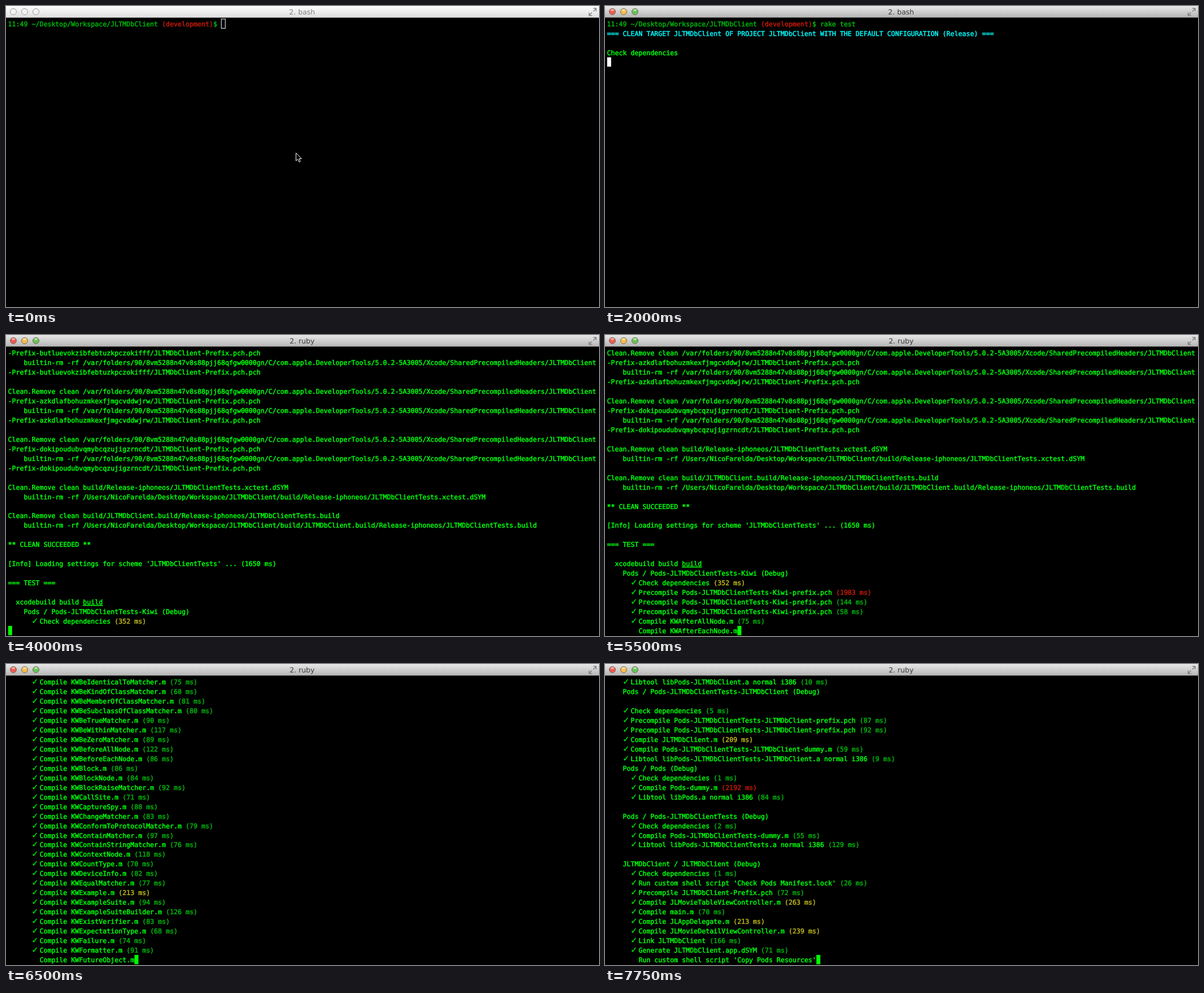
Write an HTML page that moves like this. It is 1050 px wide and 533 px high and loops after 8 s.

```html
<!DOCTYPE html>
<html lang="en">
<head>
<meta charset="utf-8">
<title>Terminal</title>
<style>
  html, body { margin: 0; width: 100%; height: 100%; overflow: hidden; background: #000; }
  svg { display: block; width: 100vw; height: 100vh; }
  text { text-rendering: geometricPrecision; }
  #rows text { font: 11.61px "DejaVu Sans Mono", monospace; }
  #rows tspan { fill: var(--ink); stroke: var(--ink); stroke-width: .5; }
  #name { font: 12.5px "DejaVu Sans", sans-serif; text-anchor: middle; }
  .b, .u { --ink: #00ff0c; }
  .u { text-decoration: underline; }
  .c { --ink: #00f8f8; }
  #rows .t { --ink: #00d40c; font: 14px "DejaVu Sans", sans-serif; }
  .g { --ink: #00b40c; }
  .y { --ink: #bcb41c; }
  .r { --ink: #c01a0a; }
</style>
</head>
<body>
<svg viewBox="0 0 1050 533" preserveAspectRatio="none">
  <defs>
    <linearGradient id="idle" x2="0" y2="1"><stop stop-color="#fdfdfd"/><stop offset="1" stop-color="#dedede"/></linearGradient>
    <linearGradient id="live" x2="0" y2="1"><stop stop-color="#e8e8e8"/><stop offset="1" stop-color="#b4b4b4"/></linearGradient>
  </defs>
  <rect width="1050" height="533"/>
  <rect id="bar" width="1050" height="20.5"/>
  <rect id="edge" y="20" width="1050" height="1"/>
  <g id="lights"></g>
  <text id="name" x="524.3" y="15"></text>
  <g fill="none" stroke="#777" stroke-width="1.2">
    <path d="M1040 9.5l4.5-4.5M1039.8 4.2h5.2v5.2M1037.5 11.5l-4.5 4.5M1037.7 16.8h-5.2v-5.2"/>
  </g>
  <g id="rows"></g>
  <rect id="cursor" width="7" height="16.5"/>
  <path id="pointer" d="M513.5 260.2v14l3.2-3 2.3 5.2 2.2-1-2.2-5h4.3z" fill="#000" stroke="#fff"/>
</svg>
<script>
const LOOP = 8000, ROWS = 30, LEFT = 3.5, TOP = 23, CW = 6.99, RH = 16.97;
const $ = id => document.getElementById(id);
const app = 'JLTMDbClient', tests = app + 'Tests', kiwi = `Pods-${tests}-Kiwi`;

// Build the log once; at() records what the screen holds from time t on.
const log = [], states = [];
const row = (...parts) => log.push(parts);
const say = text => row(['b', text]);
const gap = () => row();
const at = (t, ...tail) => states.push({ t, count: log.length, tail });
const busy = title => ['b', ' '.repeat(8) + title];
const tone = ms => ms >= 1000 ? 'r' : ms >= 200 ? 'y' : 'g';

function task(title, ms, pad = 6) {
  row(['b', ' '.repeat(pad)], ['t', '✓'], ['b', ` ${title} `], [tone(ms), `(${ms} ms)`]);
}
function compile(list, prefix = 'KW') {
  for (const item of list.split(' ')) {
    const [file, ms] = item.split(':');
    task(`Compile ${prefix}${file}.m`, +ms);
  }
}
const section = name => say(`    ${name} (Debug)`);

const banner = name => row(['c', `=== CLEAN TARGET ${name} OF PROJECT ${app} WITH THE DEFAULT CONFIGURATION (Release) ===`]);
const remove = path => say('Clean.Remove clean ' + path);
const rm = path => say('    builtin-rm -rf ' + path);

function clean(path) {
  gap();
  remove('build/' + path);
  rm(`/Users/NicoFarelda/Desktop/Workspace/${app}/build/${path}`);
}
function cleanHeader(hash) {
  const dir = `/var/folders/90/8vm5288n47v8s88pjj68qfgw0000gn/C/com.apple.DeveloperTools/5.0.2-5A3005/Xcode/SharedPrecompiledHeaders/${app}`;
  const rest = `-Prefix-${hash}/${app}-Prefix.pch.pch`;
  gap();
  remove(dir);
  say(rest);
  rm(dir);
  say(rest);
}

const prompt = typed => [['g', `11:49 ~/Desktop/Workspace/${app} `], ['r', '(development)'], ['g', '$ ' + typed]];
[[0, ''], [750, 'r'], [1000, 'rake'], [1250, 'rake te'], [1500, 'rake test']]
  .forEach(([t, typed]) => at(t, ...prompt(typed)));
row(...prompt('rake test'));
at(1750);

banner(app);
gap();
say('Check dependencies');
at(2000);
clean(`Release-iphoneos/${app}.app.dSYM`);
clean(`Release-iphoneos/${app}.app`);
cleanHeader('avzqkrhcmwtoyebnulgdfxpisjka');
at(2250);
cleanHeader('cgxnytoqwvlhebuzrkmadpifsjwe');
clean(`${app}.build/Release-iphoneos/${app}.build`);
at(2500);
gap();
banner(tests);
gap();
say('Check dependencies');
cleanHeader('fhkqdyvmxobzwnrjcetlgaspiuqo');
at(2750);
cleanHeader('butluevokzibfebtuzkpczokifff');
cleanHeader('azkdlafbohuzmkexfjmgcvddwjrw');
at(3000);
cleanHeader('dokipoudubvqmybcqzujigzrncdt');
clean(`Release-iphoneos/${tests}.xctest.dSYM`);
clean(`${app}.build/Release-iphoneos/${tests}.build`);
gap();
say('** CLEAN SUCCEEDED **');
at(3250);
gap();
const loading = `[Info] Loading settings for scheme '${tests}' ...`;
at(3500, ['b', loading]);
say(loading + ' (1650 ms)');
gap();
say('=== TEST ===');
gap();
row(['b', '  xcodebuild build '], ['u', 'build']);
section('Pods / ' + kiwi);
task('Check dependencies', 352);
at(4000);

const header = `Precompile ${kiwi}-prefix.pch`;
at(4250, busy(header));
task(header, 1983);
at(5000, busy(header));
task(header, 144);
at(5250, busy(header));
task(header, 58);
compile('AfterAllNode:75');
at(5500, busy('Compile KWAfterEachNode.m'));
compile('AfterEachNode:64 Any:66 AsyncVerifier:101 BeBetweenMatcher:79 BeEmptyMatcher:68 BeIdenticalToMatcher:75 BeKindOfClassMatcher:68');
at(5750, busy('Compile KWBeMemberOfClassMatcher.m'));
compile('BeMemberOfClassMatcher:81 BeSubclassOfClassMatcher:80 BeTrueMatcher:90 BeWithinMatcher:117 BeZeroMatcher:89 BeforeAllNode:122 BeforeEachNode:86 Block:86');
at(6000, busy('Compile KWBlockNode.m'));
compile('BlockNode:84 BlockRaiseMatcher:92 CallSite:71 CaptureSpy:88 ChangeMatcher:83 ConformToProtocolMatcher:79 ContainMatcher:97 ContainStringMatcher:76 ContextNode:118');
at(6250, busy('Compile KWCountType.m'));
compile('CountType:70 DeviceInfo:82 EqualMatcher:77 Example:213 ExampleSuite:94 ExampleSuiteBuilder:126 ExistVerifier:83 ExpectationType:68 Failure:74 Formatter:91');
at(6500, busy('Compile KWFutureObject.m'));
compile('FutureObject:87 GenericMatcher:78 GenericMatchEvaluator:96 HaveMatcher:134 InequalityMatcher:85 HaveValueMatcher:86 Intercept:115 InvocationCapturer:81 ItNode:84 MatchVerifier:151 Matcher:82 MatcherFactory:98 Matchers:110 MessagePattern:204 MessageTracker:107');
at(6750, busy('Compile KWMock.m'));
compile('Mock:287 NilMatcher:81 Null:70 ObjCUtilities:78 PendingNode:75 ProbePoller:76 RaiseMatcher:131 ReceiveMatcher:320 RegisterMatchersNode:95 RegularExpressionPatternMatcher:103 RespondToSelectorMatcher:102 Spec:226 StringContainsMatcher:77 StringPrefixMatcher:87 StringUtilities:72 Stub:150 Symbolicator:113 UserDefinedMatcher:115');
at(7000, busy('Compile KWValue.m'));
compile('Value:143 Verifying:72 Workarounds:68');
compile('Invocation+KiwiAdditions:94 MethodSignature+KiwiAdditions:73 Number+KiwiAdditions:81 Object+KiwiMockAdditions:77 Object+KiwiSpyAdditions:84 Object+KiwiStubAdditions:118', 'NS');
at(7250, busy('Compile NSObject+KiwiVerifierAdditions.m'));
compile('Object+KiwiVerifierAdditions:86 Proxy+KiwiVerifierAdditions:79', 'NS');
task(`Compile ${kiwi}-dummy.m`, 61);
task(`Libtool lib${kiwi}.a normal i386`, 92);
gap();

function library(name, [deps, pch, again, main, dummy, lib]) {
  section('Pods / ' + name);
  gap();
  task('Check dependencies', deps, 4);
  task(`Precompile ${name}-prefix.pch`, pch, 4);
  task(`Precompile ${name}-prefix.pch`, again, 4);
  task(`Compile ${app}.m`, main, 4);
  task(`Compile ${name}-dummy.m`, dummy, 4);
  task(`Libtool lib${name}.a normal i386`, lib, 4);
}
library('Pods-' + app, [3, 95, 89, 214, 62, 10]);
library(`Pods-${tests}-${app}`, [5, 87, 92, 209, 59, 9]);
section('Pods / Pods');
task('Check dependencies', 1);
task('Compile Pods-dummy.m', 2192);
at(7500, busy('Libtool libPods.a normal i386'));
task('Libtool libPods.a normal i386', 84);
gap();
section('Pods / Pods-' + tests);
task('Check dependencies', 2);
task(`Compile Pods-${tests}-dummy.m`, 55);
task(`Libtool libPods-${tests}.a normal i386`, 129);
gap();
section(`${app} / ${app}`);
task('Check dependencies', 1);
task("Run custom shell script 'Check Pods Manifest.lock'", 26);
task(`Precompile ${app}-Prefix.pch`, 72);
compile('JLMovieTableViewController:263 main:70 JLAppDelegate:213 JLMovieDetailViewController:239', '');
task('Link ' + app, 166);
task(`Generate ${app}.app.dSYM`, 71);
at(7750, busy("Run custom shell script 'Copy Pods Resources'"));

function rowMarkup(parts, i) {
  let col = 0;
  const spans = parts.map(([cls, s]) => {
    const x = LEFT + col * CW;
    col += s.length;
    return `<tspan class="${cls}" x="${x.toFixed(2)}">${s.replace(/ /g, '\u00a0')}</tspan>`;
  });
  return `<text y="${(TOP + 13 + i * RH).toFixed(2)}">${spans.join('')}</text>`;
}
function set(id, attrs) {
  for (const key in attrs) $(id).setAttribute(key, attrs[key]);
}

function drawWindow(t) {
  const live = t >= 750, ruby = t >= 2250;
  const colors = live ? ['#ee5b52', '#f5bd4c', '#66c455'] : Array(3).fill('#f2f2f2');
  $('lights').innerHTML = colors.map((c, i) =>
    `<circle cx="${13 + 20 * i}" cy="10" r="5.5" fill="${c}" stroke="${live ? '#756a5c' : '#9a9a9a'}"/>` +
    (live ? `<ellipse cx="${13 + 20 * i}" cy="7.2" rx="3" ry="1.7" fill="#fff" opacity=".55"/>` : '')).join('');
  set('bar', { fill: live ? 'url(#live)' : 'url(#idle)' });
  set('edge', { fill: live ? '#555' : '#8c8c8c' });
  set('name', { fill: live ? '#3a3a3a' : '#808080' });
  $('name').textContent = ruby ? '2. ruby' : '2. bash';
  set('pointer', { visibility: live ? 'hidden' : 'visible' });
  const color = ruby ? '#00ff00' : '#fff';
  set('cursor', { fill: live ? color : 'none', stroke: live ? 'none' : '#fff' });
}

let shown;
function draw(t) {
  const state = states.findLast(s => s.t <= t);
  if (state === shown) return;
  shown = state;
  const screen = [...log.slice(0, state.count), state.tail].slice(-ROWS);
  $('rows').innerHTML = screen.map(rowMarkup).join('');
  const col = state.tail.reduce((n, part) => n + part[1].length, 0);
  set('cursor', { x: LEFT + col * CW + .3, y: TOP + (screen.length - 1) * RH });
  drawWindow(state.t);
}
function tick() {
  draw(performance.now() % LOOP);
  requestAnimationFrame(tick);
}
tick();
</script>
</body>
</html>
```
